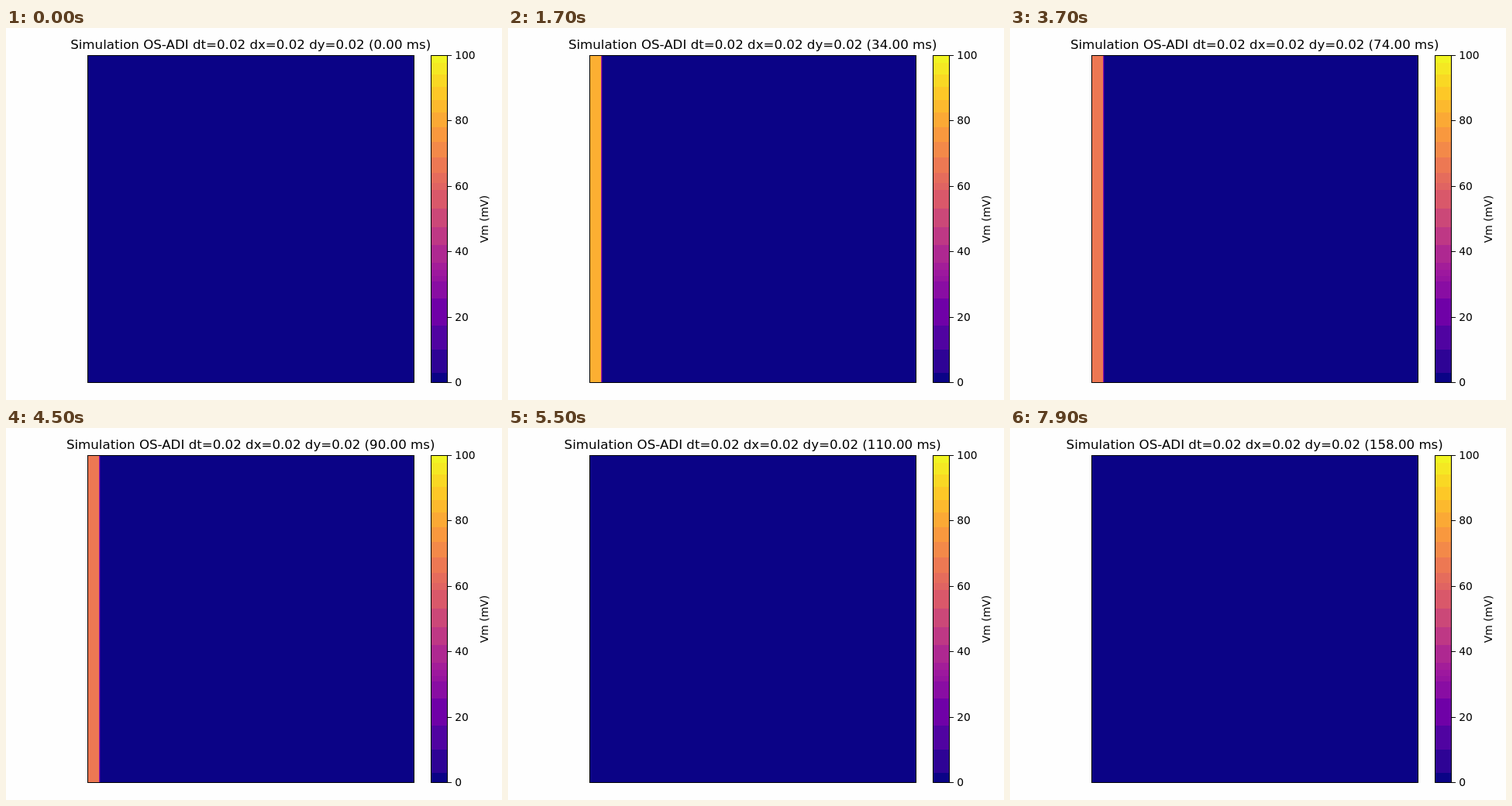
These frames come from a looping animation (640x480 px, 8 s). An HTML page:

```html
<!DOCTYPE html>
<html lang="en">
<head>
<meta charset="utf-8">
<title>Simulation</title>
<style>
  html, body { margin: 0; width: 100%; height: 100%; overflow: hidden; background: #fefefe; }
  svg { display: block; width: 640px; height: 480px; }
  rect, path { shape-rendering: crispEdges; }
  text { font-family: "DejaVu Sans", sans-serif; font-size: 13.889px; fill: #000; }
  #title { font-size: 16.667px; }
  .line { fill: none; stroke: #000; stroke-width: 1; }
</style>
</head>
<body>
<svg id="stage" viewBox="0 0 640 480">
  <rect id="field" x="106" y="36" width="420" height="421"/>
  <rect id="strip" x="106" y="36" width="14" height="421"/>
  <rect id="edge" x="120" y="36" width="1" height="421"/>
  <rect id="fringe" x="121" y="36" width="1" height="421"/>
  <rect class="line" x="105.5" y="35.5" width="421" height="422"/>
  <g id="bar"></g>
  <rect class="line" x="548.5" y="35.5" width="21" height="422"/>
  <g id="ticks"></g>
  <text id="title" x="315.7" y="27" text-anchor="middle"></text>
  <text transform="translate(622 246.5) rotate(-90)" text-anchor="middle">Vm (mV)</text>
</svg>
<script>
const LOOP = 8000, STEP = 100, MS_PER_STEP = 2;
const TOP = 35.5, BOTTOM = 457.5;

// Colour map anchors, evenly spaced from 0 to 100 mV
const PLASMA = ["0b0386", "46039f", "7201a8", "9c179e", "bd3786",
  "d8576b", "ed7953", "fb9f3a", "fdca26", "f0f921"]
  .map(hex => [0, 2, 4].map(i => parseInt(hex.slice(i, i + 2), 16)));

// Lower edges of the colour bar bands, bottom to top
const BANDS = [457, 445, 415, 384, 349, 327, 320, 312, 303, 280, 257, 233, 209,
  200, 187, 167, 147, 128, 109, 93, 76, 60, 45, 36];

// [time in ms, strip voltage in mV], held until the next entry
const VOLTAGE = [
  [0, 0], [100, 93], [1000, 89], [1400, 85], [1600, 82], [2000, 78],
  [2400, 72], [2700, 66.5], [4600, 57], [4700, 46], [4800, 33],
  [4900, 21], [5000, 11], [5100, 5], [5200, 0]
];

const byId = id => document.getElementById(id);

function add(parent, tag, attrs, text) {
  const el = document.createElementNS("http://www.w3.org/2000/svg", tag);
  for (const key in attrs) el.setAttribute(key, attrs[key]);
  if (text !== undefined) el.textContent = text;
  parent.appendChild(el);
}

function plasma(mv) {
  const pos = Math.max(0, Math.min(100, mv)) / 100 * 9;
  const i = Math.min(8, Math.floor(pos));
  const rgb = PLASMA[i].map((c, k) => Math.round(c + (PLASMA[i + 1][k] - c) * (pos - i)));
  return `rgb(${rgb})`;
}

function drawBar() {
  for (let i = 0; i < BANDS.length - 1; i++) {
    const low = BANDS[i], high = BANDS[i + 1];
    const mv = i ? (BOTTOM - (low + high) / 2) / (BOTTOM - TOP) * 100 : 0;
    add(byId("bar"), "rect", { x: 549, y: high, width: 20, height: low - high, fill: plasma(mv) });
  }
  for (let mv = 0; mv <= 100; mv += 20) {
    const y = BOTTOM - mv / 100 * (BOTTOM - TOP);
    add(byId("ticks"), "path", { class: "line", d: `M570 ${Math.floor(y) + 0.5}h4.5` });
    add(byId("ticks"), "text", { x: 579.2, y: Math.round(y + 4.5) }, mv);
  }
}

function render(time) {
  const step = Math.floor(time % LOOP / STEP);
  const mv = VOLTAGE.filter(([t]) => t <= step * STEP).pop()[1];
  byId("title").textContent =
    `Simulation OS-ADI dt=0.02 dx=0.02 dy=0.02 (${(step * MS_PER_STEP).toFixed(2)} ms)`;
  byId("strip").setAttribute("fill", plasma(mv));
  byId("edge").setAttribute("fill", plasma(mv * 0.45));
  byId("fringe").setAttribute("fill", plasma(mv * 0.1));
}

byId("field").setAttribute("fill", plasma(0));
drawBar();
const start = performance.now();
function tick() {
  render(performance.now() - start);
  requestAnimationFrame(tick);
}
tick();
</script>
</body>
</html>
```
